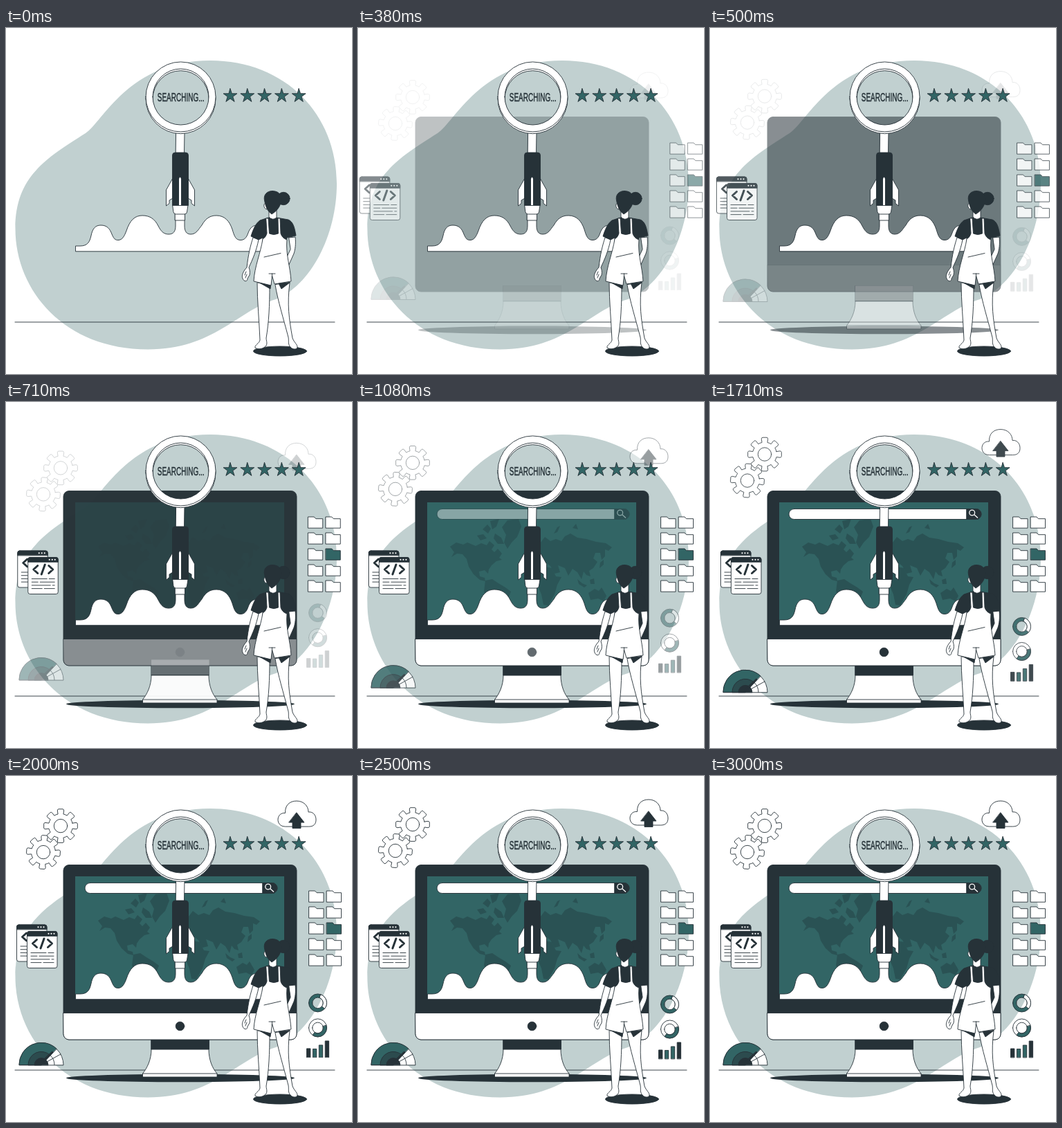
An HTML page that plays this animation: 500x500 px, repeating every 3.04 s.

```html
<!DOCTYPE html>
<html lang="en">
<head>
<meta charset="utf-8">
<title>Searching</title>
<style>
html, body { margin: 0; width: 100%; height: 100%; overflow: hidden; background: #fff; }
svg { display: block; width: 100vw; height: 100vh; }
.w, .d, .t, .l { stroke: #263238; stroke-width: .9; stroke-linejoin: round; stroke-linecap: round; }
.w { fill: #fff; }
.d { fill: #263238; }
.t { fill: #326565; }
.l { fill: none; }
.n { stroke: none; }
text { font-family: "Liberation Sans", Arial, sans-serif; font-size: 16.7px; text-anchor: middle; fill: #263238; stroke: #263238; stroke-width: .5; }
</style>
</head>
<body>
<svg viewBox="0 0 500 500">
  <path fill="#c1d0d0" d="M115 152C140 136 177 47 295 47C404 47 478 125 478 225C478 300 440 372 390 392C335 408 300 464.5 205 464.5C85 464.5 13.5 380 13.5 290C13.5 215 58 188 115 152Z"/>
  <path class="l" d="M13 425H475"/>

  <g id="gears"></g>
  <g id="cloud">
    <path class="w" d="M403 73C389 73 390 52 403.500 53.500C403 42 410 36 420 36C430 36 437 43 437 52C443 51 448 56 448 63C448 70 444 73 438 73Z"/>
    <path class="d" d="M420 53L431 67H426V75.500H414V67H409Z"/>
  </g>
  <g id="folders"></g>
  <g id="windows"></g>
  <g id="charts"></g>
  <g id="gauge">
    <path class="w" d="M19 417.500A32 32 0 0 1 83 417.500Z"/>
    <path class="t" d="M51 417.500H19A32 32 0 0 1 73 394Z"/>
    <path class="l" d="M51 417.500L79 402"/>
    <path class="d" fill-opacity=".5" d="M32 417.500A19 19 0 0 1 64 403.500L51 417.500Z"/>
    <path class="l" d="M64 403.500A19 19 0 0 1 70 417.500"/>
    <path class="d" d="M41 417.500A10 10 0 0 1 61 417.500Z"/>
    <path class="l" style="stroke-width:2.500" d="M51 414L67 399"/>
  </g>

  <g id="base">
    <ellipse class="d n" cx="252" cy="436.500" rx="165" ry="5.800"/>
    <rect class="d" x="83" y="128.500" width="337" height="252.500" rx="8"/>
  </g>
  <g id="screen">
    <path class="t n" d="M100 145H402V322H100Z"/>
    <g id="map" fill="#2a5254">
      <path d="M133 209L142 203L152 206L158 203L170 208L178 204L186 207L190 201L197 207L193 213L197 217L202 212L208 219L204 225L208 228L200 230L193 236L189 242L188 248L183 243L175 245L176 252L183 254L184 259L176 257L167 249L160 238L157 227L151 220L143 219L135 224L139 217Z"/>
      <path d="M184 258L194 256L203 262L213 268L221 274L217 284L209 294L203 306L197 314L194 300L189 286L182 274Z"/>
      <path d="M208 181L216 171L232 169L236 180L230 195L222 203L216 212L211 203L214 192Z"/>
      <path d="M180 184L187 177L192 183L188 190ZM191 172L204 169L200 180L194 184ZM172 193L181 191L186 197L177 200ZM198 190L207 196L211 205L202 205L196 197Z"/>
      <path d="M249 224L254 216L262 212L264 203L270 195L278 201L286 198L294 201L299 194L307 190L317 196L330 198L344 202L358 204L367 210L362 215L357 213L357 223L352 228L350 218L343 218L340 226L346 231L340 240L334 244L336 252L330 250L326 245L323 256L317 246L310 241L304 251L299 240L289 236L292 246L284 248L278 237L270 231L265 235L261 227L253 232Z"/>
      <path d="M247 239L258 234L270 238L280 240L286 252L294 253L288 264L284 278L275 294L268 293L265 278L260 266L249 262L243 251Z"/>
      <path d="M333 276L342 270L348 273L352 268L359 280L355 288L347 284L336 286ZM317 256L324 262L331 265L327 268L319 263ZM335 257L341 255L342 263L336 263ZM350 232L355 228L355 235L349 240ZM283 190L288 181L292 179L288 188ZM310 182L315 176L318 184ZM243 212L248 207L250 215L244 218Z"/>
    </g>
  </g>
  <g id="stand">
    <path class="w n" d="M210 372.500H293.500V396H210Z"/>
    <path class="w" d="M210 395C210 410 204 422 197.500 430V435H305V430C298 422 293 410 293 395Z"/>
    <path class="l" d="M197.500 430H305"/>
  </g>
  <path id="neck" class="d" d="M210 372.500H293.500V395H210Z"/>
  <path id="chin" class="w" d="M83 342.500H420V373A8 8 0 0 1 412 381H91A8 8 0 0 1 83 373Z"/>
  <circle id="button" class="d" cx="251.500" cy="361.500" r="6.300"/>
  <g id="search">
    <rect class="w" x="114" y="154.500" width="278" height="15" rx="7.500"/>
    <path class="d" d="M371 154.500H384.500A7.500 7.500 0 0 1 384.500 169.500H371Z"/>
    <path fill="none" stroke="#fff" stroke-width="1.300" d="M382 163L387 167.500M374.800 160A3.900 3.900 0 1 0 382.600 160A3.900 3.900 0 1 0 374.800 160"/>
  </g>

  <path class="w" d="M100.500 322.500V315H107C118 315 121 309 123 300C125 290 129 285 137 285C146 285 150 290 153 298C156 305 158 306.500 162 306.500C168 306.500 171 301 174 293C179 278 186 271 197 271C208 271 215 276 220 286C224 294 228 298 235 298C242 298 245 294 245 286V268H258V286C258 294 261 298 267 298C275 298 278 291 283 285C288 276 294 271 304 271C316 271 323 279 327 291C330 301 332 306.500 339 306.500C345 306.500 348 302 350 296C353 288 357 285 364 285C374 285 378 291 380 300C382 309 386 315 396 315H402V322.500Z"/>

  <g id="rocket">
    <path class="w" d="M246 150H258L257.500 181H245.500Z"/>
    <path class="w" d="M241 217L231.500 234V257L236 253.500V249L241 246ZM263 217L272.500 234V257L268 253.500V249L263 246Z"/>
    <path class="w" d="M244.500 268H258.500V278H244.500Z"/>
    <path class="w" d="M241 256H263L261.500 266Q261 269 258 269H245.500Q242.500 269 242 266Z"/>
    <path class="d" d="M240.500 256V184Q240.500 180 244.500 180H259.500Q263.500 180 263.500 184V256Z"/>
    <path class="w n" d="M250 256V218Q251.500 213 253 218V256Z"/>
  </g>
  <text transform="translate(252.700 105.500) scale(.6 1)">SEARCHING...</text>
  <g id="stars"></g>

  <g id="woman">
    <ellipse class="d" cx="396" cy="467" rx="38.500" ry="7"/>
    <path class="w" d="M363 368C363 395 366 425 367 451C366 456 359 458 360 462C364 465 372 464 376 459C378 455 376 452 376 448C380 425 381 400 381 373ZM389 371C393 395 401 420 408 447C409 452 407 457 411 461C414 465 421 465 421 461C421 457 416 454 414 448C409 420 406 400 410 368Z"/>
    <path class="d" d="M368 369L382 377L383 369ZM394 369L398 377L410 368Z"/>
    <path class="w" d="M357 303C353 315 350 328 348 346C343 351 340 358 342 362C344 367 349 367 349 362L352 357C353 352 352 349 351 346C356 335 362 322 365 306ZM409 303L418 302C419 312 418 320 416 326L408 344L404 335L411 320Z"/>
    <path class="l" d="M345 357L347 352M346 361L348 356"/>
    <path class="d" d="M379 274L367 278C361 282 357 291 354 301L365 306L371 303V312H405L406 303L419 300C417 288 415 280 408 277L391 274Z"/>
    <path class="w" d="M380 262V273Q385 279 391 274V262Z"/>
    <path class="w" d="M376 275H379L380.500 297Q387 300 393.500 297L393 275H396L397 297C399 303 403 305 406 306C404 328 411 345 412 366L388 370L384.500 358L383 372L358 366C359 345 368 325 371 305Q376 302 377 297Z"/>
    <path class="l" d="M373 331L397 325.500M380 355H389M384.500 355V360"/>
    <path class="w" d="M376 253C371 252 372 262 377 262Z"/>
    <circle class="d" cx="401" cy="246.500" r="9.200"/>
    <path class="d" d="M385 235.500C376 235.500 372 242 373.500 249C375 257 377 264 384 269C391 265 397 258 398 248C398 240 393 235.500 385 235.500Z"/>
  </g>
</svg>
<script>
const $ = id => document.getElementById(id);
const path = (cls, d) => `<path class="${cls}" d="${d}"/>`;
const circle = (cls, x, y, r) => `<circle class="${cls}" cx="${x}" cy="${y}" r="${r}"/>`;
const polar = (x, y, r, deg) => {
  const a = deg * Math.PI / 180;
  return `${(x + r * Math.cos(a)).toFixed(2)} ${(y + r * Math.sin(a)).toFixed(2)}`;
};
const ringPath = (x, y, r) => `M${x - r} ${y}a${r} ${r} 0 1 0 ${2 * r} 0a${r} ${r} 0 1 0 ${-2 * r} 0Z`;
const ring = (cls, x, y, R, r) =>
  `<path class="${cls}" fill-rule="evenodd" d="${ringPath(x, y, R)}${ringPath(x, y, r)}"/>`;

function gear(x, y, turn) {
  let d = "";
  for (let i = 0; i < 8; i++) {
    const a = turn + i * 45;
    d += `${i ? "L" : "M"}${polar(x, y, 17.5, a - 13)}L${polar(x, y, 22.5, a - 12)}` +
      `Q${polar(x, y, 24.5, a - 11)} ${polar(x, y, 24.5, a - 7)}L${polar(x, y, 24.5, a + 7)}` +
      `Q${polar(x, y, 24.5, a + 11)} ${polar(x, y, 22.5, a + 12)}L${polar(x, y, 17.5, a + 13)}` +
      `A17.5 17.5 0 0 1 ${polar(x, y, 17.5, a + 32)}`;
  }
  return path("w", d + "Z") + circle("w", x, y, 9.7);
}

function star(x, y) {
  const points = Array.from({ length: 10 }, (_, i) => polar(x, y, i % 2 ? 4 : 10.4, i * 36 - 90));
  return path("t", `M${points.join("L")}Z`);
}

function page(x, y) {
  let s = `<rect class="w" x="${x}" y="${y}" width="43.5" height="53" rx="3"/>` +
    path("d", `M${x} ${y + 6.5}v-3.500q0 -3 3 -3h37.500q3 0 3 3v3.500Z`);
  for (let i = 0; i < 3; i++) s += circle("w n", x + 31 + i * 4, y + 3.3, 1.1);
  s += `<path class="l" style="stroke-width:3" d="M${x + 14} ${y + 12}l-6 5.500l6 5.500M${x + 30} ${y + 12}l6 5.500l-6 5.500M${x + 24.5} ${y + 10.5}l-5 14"/>`;
  for (let i = 0; i < 4; i++) {
    const gap = [22, 9, 27, 15][i];
    s += path("l", `M${x + 5.5} ${y + 31 + i * 4.7}h${gap}m3 0H${x + 38.5}`);
  }
  return s;
}

function wedge(cls, x, y, R, r, a, b) {
  const big = b - a > 180 ? 1 : 0;
  return path(cls, `M${polar(x, y, R, a)}A${R} ${R} 0 ${big} 1 ${polar(x, y, R, b)}` +
    `L${polar(x, y, r, b)}A${r} ${r} 0 ${big} 0 ${polar(x, y, r, a)}Z`);
}

$("gears").innerHTML = gear(79, 72, 0) + gear(54, 110, 4);
$("windows").innerHTML = page(15.5, 215) + page(30.5, 224.5);
$("stars").innerHTML = [0, 1, 2, 3, 4].map(i => star(324 + i * 24.8, 98)).join("");
for (let i = 0; i < 10; i++)
  $("folders").innerHTML += path(i === 5 ? "t" : "w",
    `M${438 + i % 2 * 25.5} ${166 + (i >> 1) * 23}h8.500l2.500 2.700h10v13.500h-21Z`);
$("charts").innerHTML =
  ring("t", 450.5, 328, 13, 7.8) + wedge("w", 450.5, 328, 13, 7.8, -70, 40) +
  ring("w", 450.5, 364, 13, 7.8) + wedge("t", 450.5, 364, 13, 7.8, -15, 125) +
  [12.5, 12, 17.5, 23.5].map((h, i) =>
    path(i % 3 ? "t" : "d", `M${434.5 + i * 8.9} 406.500v${-h}h5.400v${h}Z`)).join("");
$("rocket").innerHTML += ring("w", 252.5, 102.2, 50.5, 40.5) + ring("w", 252.5, 99.5, 50.5, 40.5);

// Cubic Bezier easing that overshoots before settling
function ease(x) {
  if (x <= 0) return 0;
  if (x >= 1) return 1;
  const at = (s, p, q) => 3 * (1 - s) * (1 - s) * s * p + 3 * (1 - s) * s * s * q + s ** 3;
  let lo = 0, hi = 1;
  for (let i = 0; i < 24; i++) {
    const mid = (lo + hi) / 2;
    if (at(mid, .36, .5) < x) lo = mid; else hi = mid;
  }
  return at(lo, -.01, 1.38);
}

const clamp = v => Math.min(1, Math.max(0, v));
const LOOP = 3040, HOLD = 130, LEAD = 30;
// id, duration, starting offset
const slides = [
  ["gears", 3000, 0, 30], ["cloud", 3000, 0, 30], ["charts", 3000, 0, -30],
  ["gauge", 2000, 0, -30], ["folders", 1000, 30, 0], ["windows", 1000, -30, 0]
];
// id, start, end
const fades = [
  ["base", 240, 720], ["stand", 350, 740], ["neck", 330, 880], ["chin", 450, 1040],
  ["screen", 550, 1070], ["map", 550, 1200], ["button", 640, 1250], ["search", 860, 1390]
];

function draw(now) {
  const time = now % LOOP;
  const t = time < HOLD ? 0 : time + LEAD;
  for (const [id, span, dx, dy] of slides) {
    const p = ease(t / span);
    $(id).setAttribute("transform", `translate(${dx * (1 - p)} ${dy * (1 - p)})`);
    $(id).setAttribute("opacity", clamp(p));
  }
  for (const [id, from, to] of fades)
    $(id).setAttribute("opacity", clamp((time - from) / (to - from)));
}

const start = performance.now();
function tick() {
  draw(performance.now() - start);
  requestAnimationFrame(tick);
}
draw(0);
requestAnimationFrame(tick);
</script>
</body>
</html>
```
